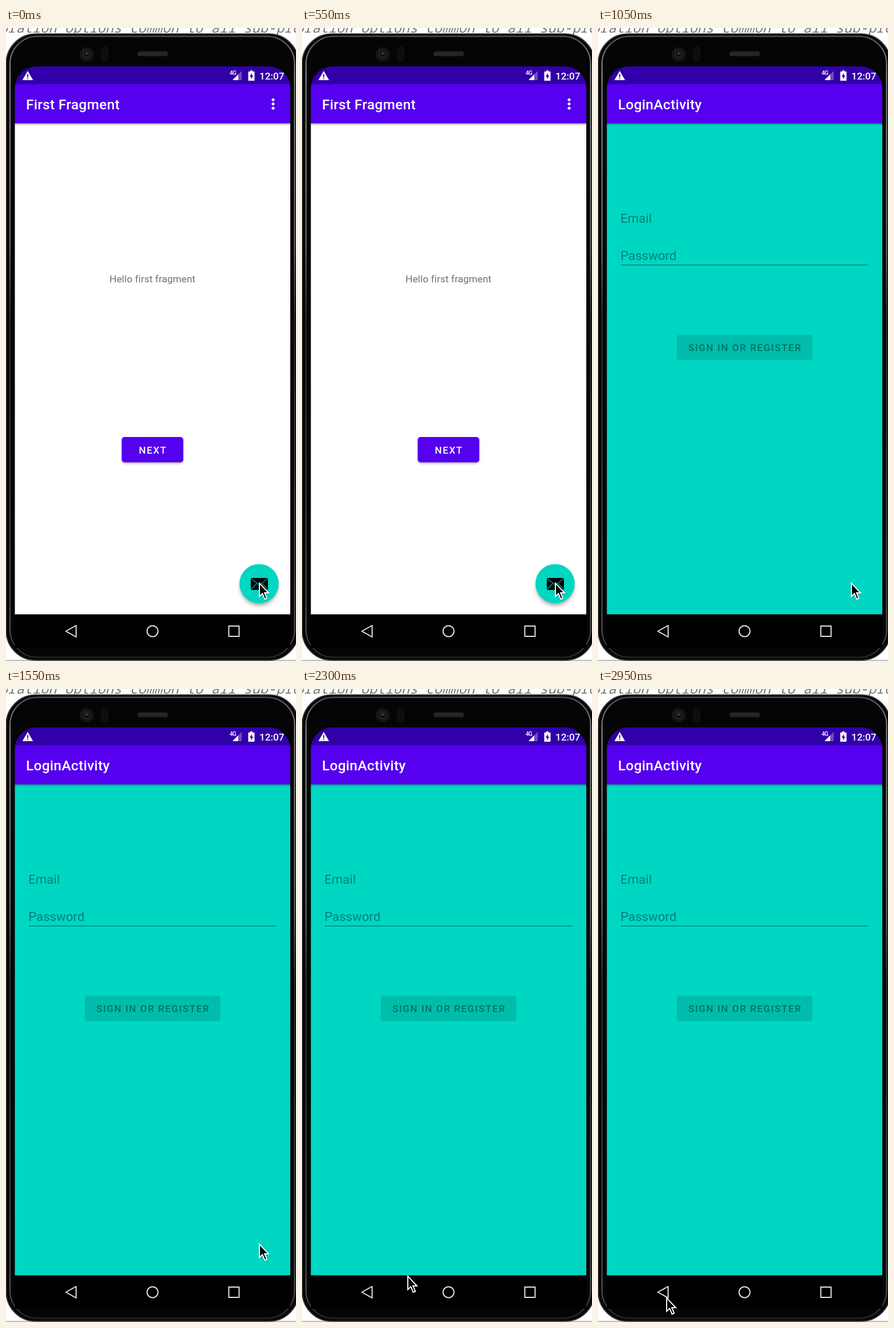
An HTML page for the animation above (3000 ms loop, 507 px wide and 1105 px high).

```html
<!DOCTYPE html>
<html lang="en">
<head>
<meta charset="utf-8">
<title>Fragment to login</title>
<style>
  html, body { margin: 0; width: 100%; height: 100%; overflow: hidden; background: #fff; }
  svg { display: block; width: 507px; height: 1105px; font-family: Roboto, sans-serif; }
  .title { font-size: 24.46px; font-weight: 500; letter-spacing: .3px; fill: #fff; }
  .button { font-size: 17.12px; font-weight: 500; letter-spacing: 1.53px; }
  .hint { font-size: 22.2px; fill: #000; fill-opacity: .4; }
  .code { font: italic 23.7px "Noto Sans Mono", monospace; fill: #777; }
</style>
</head>
<body>
<svg viewBox="0 0 507 1105">
  <defs>
    <linearGradient id="edge" x1="0" y1="10" x2="0" y2="1104" gradientUnits="userSpaceOnUse">
      <stop offset="0" stop-color="#555"/>
      <stop offset=".06" stop-color="#8a8a8a"/>
      <stop offset=".34" stop-color="#707070"/>
      <stop offset=".46" stop-color="#2a2a2a"/>
      <stop offset=".7" stop-color="#3c3c3c"/>
      <stop offset=".95" stop-color="#555"/>
      <stop offset="1" stop-color="#222"/>
    </linearGradient>
    <linearGradient id="fade" x1="0" y1="0" x2="0" y2="1">
      <stop offset="0" stop-color="#000" stop-opacity=".3"/>
      <stop offset="1" stop-color="#000" stop-opacity="0"/>
    </linearGradient>
    <clipPath id="screen"><path d="M15.5 1082V105a38 38 0 0 1 38-38H459a38 38 0 0 1 38 38V1082z"/></clipPath>
    <filter id="soft" x="-30%" y="-30%" width="160%" height="170%"><feGaussianBlur stdDeviation="2"/></filter>
    <filter id="softer" x="-30%" y="-30%" width="160%" height="170%"><feGaussianBlur stdDeviation="3.5"/></filter>
  </defs>

  <rect width="507" height="1105" fill="#fff"/>
  <text class="code" x="-11" y="8" xml:space="preserve">oration options common to all sub-projects</text>
  <path d="M0 1104H507" stroke="#aaa" stroke-width="1.5"/>

  <!-- phone body -->
  <rect x="0" y="10" width="512" height="1094" rx="52" fill="#080808" stroke="#4a4a4a" stroke-width="1.5"/>
  <rect x="7" y="14.5" width="497.5" height="1084" rx="48" fill="#060606" stroke="url(#edge)" stroke-width="2"/>
  <rect x="11" y="18" width="490" height="1076" rx="44" fill="#050505"/>
  <circle cx="141" cy="46" r="12.5" fill="#151515"/>
  <circle cx="141" cy="46" r="7" fill="#222"/>
  <circle cx="141" cy="46" r="4" fill="#0c0c0c"/>
  <circle cx="141" cy="44.5" r="1.6" fill="#666"/>
  <rect x="167" y="33" width="10.5" height="25" rx="5" fill="#0d0d0d" stroke="#191919"/>
  <rect x="230" y="41" width="53" height="8" rx="3.5" fill="#262626" stroke="#191919"/>

  <g clip-path="url(#screen)">
    <rect id="page" x="15" y="166" width="483" height="858"/>
    <rect x="15" y="166" width="483" height="5" fill="url(#fade)"/>
    <rect x="15" y="67" width="483" height="32" fill="#3200a9"/>
    <rect x="15" y="98" width="483" height="68.5" fill="#5500ee"/>
    <rect x="15" y="1023.5" width="483" height="59" fill="#000"/>

    <!-- status icons -->
    <path d="M38 75L47.3 91H28.7z" fill="#fff"/>
    <path d="M38 80.5V86M38 87.4V89.2" stroke="#3200a9" stroke-width="1.8"/>
    <text x="391" y="82" font-size="10" font-weight="500" fill="#fff" letter-spacing="-.6">4G</text>
    <path d="M412 75V91H396z" fill="#fff" fill-opacity=".3"/>
    <path d="M406 81V91H396z" fill="#fff"/>
    <path d="M427 74h4v2h3.5v16h-11V76h3.5z" fill="#fff"/>
    <path d="M430 78.5L425.8 85H428.5V90L432.4 83.3H430z" fill="#3200a9"/>
    <text x="443" y="89.6" font-size="17.1" font-weight="500" fill="#fff">12:07</text>

    <g id="home">
      <text class="title" x="34.9" y="142">First Fragment</text>
      <g fill="#fff">
        <circle cx="467" cy="125.3" r="2.5"/>
        <circle cx="467" cy="132.6" r="2.5"/>
        <circle cx="467" cy="139.9" r="2.5"/>
      </g>
      <text x="256.2" y="443.6" text-anchor="middle" font-size="17.12" letter-spacing=".13" fill="#6f6f6f">Hello first fragment</text>
      <rect x="203" y="717" width="106.5" height="43" rx="5" fill="#000" opacity=".35" filter="url(#soft)"/>
      <rect x="202.3" y="714" width="107.6" height="44.2" rx="4.9" fill="#5500ee"/>
      <text class="button" x="256.9" y="742.7" text-anchor="middle" fill="#fff">NEXT</text>
      <circle cx="442.5" cy="975" r="33" fill="#000" opacity=".35" filter="url(#softer)"/>
      <circle cx="442.5" cy="970" r="34.3" fill="#00d6c1"/>
      <rect x="428" y="960" width="30" height="21" rx="2.5" fill="#000"/>
      <path d="M429 961.5L443 972.5L457 961.5M429 979.5L438.5 969.5M457 979.5L447.5 969.5" fill="none" stroke="#00a898" stroke-width="1.2"/>
    </g>

    <g id="login">
      <text class="title" x="34.9" y="142">LoginActivity</text>
      <text class="hint" x="39.2" y="339.8">Email</text>
      <text class="hint" x="39.2" y="405">Password</text>
      <path d="M40 413.6H472" stroke="#000" stroke-opacity=".46" stroke-width="1.3"/>
      <rect x="137.5" y="535.4" width="237.5" height="44.4" rx="4.9" fill="#000" fill-opacity=".12"/>
      <text class="button" x="257" y="564" text-anchor="middle" fill="#000" fill-opacity=".4">SIGN IN OR REGISTER</text>
    </g>

    <g fill="none" stroke="#e2e2e2" stroke-width="2" stroke-linejoin="round">
      <path d="M104.6 1053L122.6 1043V1063z"/>
      <circle cx="256.2" cy="1053" r="9.6"/>
      <rect x="389.5" y="1044" width="18" height="18"/>
    </g>
  </g>

  <g id="cursor">
    <path d="M1 3V26.5L6.5 21.3L10.8 31L14.6 29.3L10.4 20H18z" fill="#000" opacity=".3" filter="url(#soft)"/>
    <path d="M1 2.2V25.3L6.3 20.3L10.5 30.2L14.2 28.6L10 19H17z" fill="#000" stroke="#fff" stroke-width="1.9"/>
  </g>
</svg>
<script>
  const LOOP = 3000, STEP = 50, SWITCH = 1050;
  const el = id => document.getElementById(id);
  const page = el('page'), home = el('home'), login = el('login'), cursor = el('cursor');

  // time, x, y of the pointer tip
  const path = [
    [0, 442, 967], [1650, 442, 967], [1850, 372, 980], [2050, 256, 1004],
    [2200, 202, 1016], [2300, 184, 1023], [2500, 142, 1048],
    [2700, 119, 1068], [2750, 118, 1069], [2900, 119, 1061], [LOOP, 119, 1061]
  ];

  function pointer(t) {
    const i = path.findIndex(p => p[0] > t);
    const a = path[i - 1], b = path[i];
    const k = (t - a[0]) / (b[0] - a[0]);
    return [a[1] + (b[1] - a[1]) * k, a[2] + (b[2] - a[2]) * k];
  }

  function draw(ms) {
    const t = Math.floor((ms % LOOP) / STEP) * STEP;
    const signedOut = t >= SWITCH;
    page.setAttribute('fill', signedOut ? '#00d7c3' : '#fff');
    home.style.display = signedOut ? 'none' : '';
    login.style.display = signedOut ? '' : 'none';
    const [x, y] = pointer(t);
    cursor.setAttribute('transform', `translate(${x} ${y})`);
  }

  const start = performance.now();
  function tick() {
    draw(performance.now() - start);
    requestAnimationFrame(tick);
  }
  tick();
</script>
</body>
</html>
```
